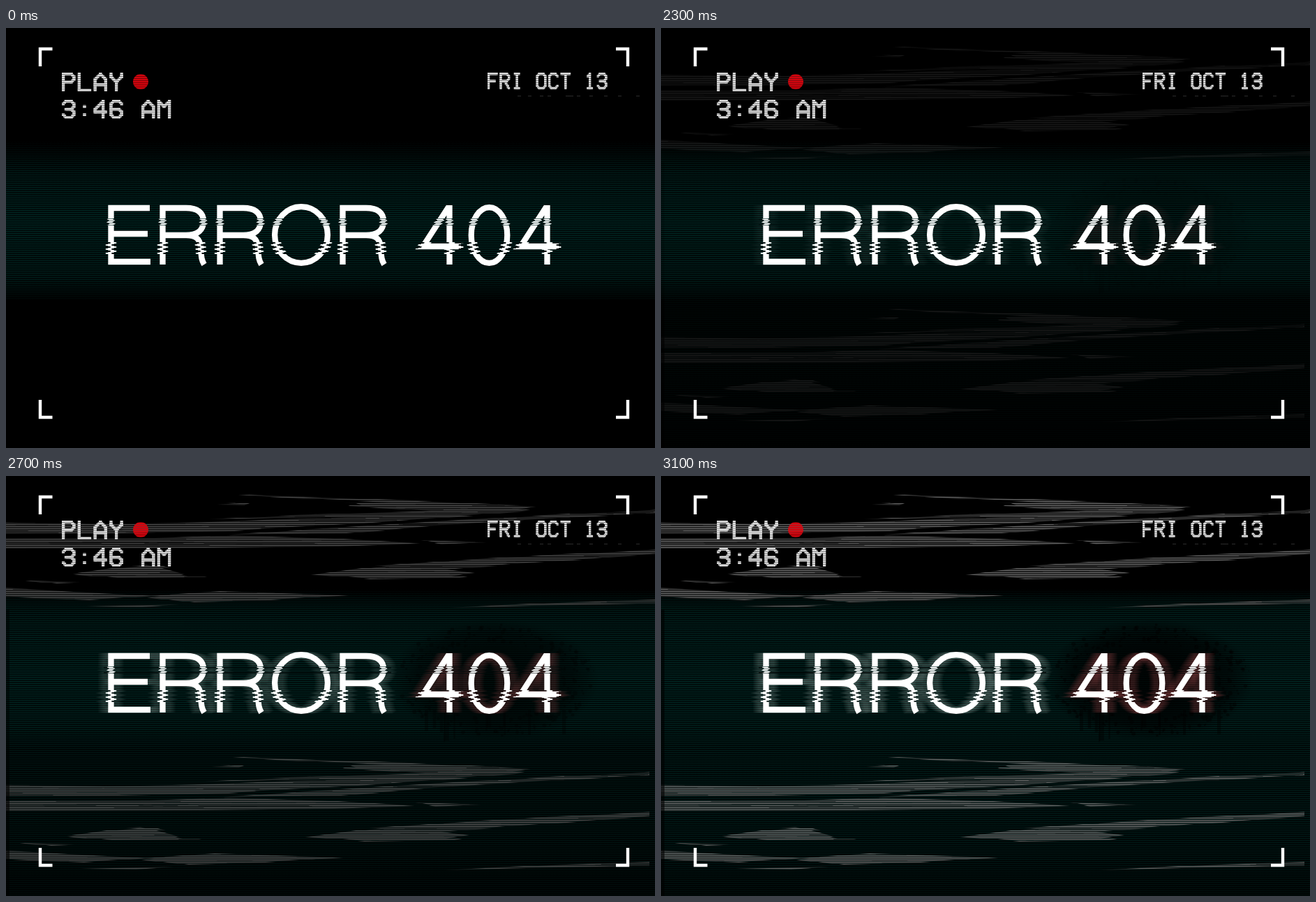
An HTML page with a canvas that plays this animation: 930 by 602 pixels, repeating every 3300 ms.

```html
<!DOCTYPE html>
<html lang="en">
<head>
<meta charset="utf-8">
<title>Error 404</title>
<style>
  html, body { margin: 0; width: 100%; height: 100%; overflow: hidden; background: #000; }
  canvas { position: absolute; left: 0; top: 0; }
  #glitch { opacity: 0; animation: flicker 3300ms step-end infinite; }
  @keyframes flicker {
    0% { opacity: 0; }
    60.6% { opacity: .5; }
    63.63% { opacity: 1; }
    69.69% { opacity: .25; }
    72.72% { opacity: 1; }
    78.78% { opacity: .5; }
    81.81% { opacity: .75; }
    84.84% { opacity: 1; }
    90.9% { opacity: .75; }
    93.93% { opacity: 1; }
  }
</style>
</head>
<body>
<canvas id="back" width="930" height="602"></canvas>
<canvas id="glitch" width="930" height="602"></canvas>
<canvas id="front" width="930" height="602" role="img"
  aria-label="PLAY 3:46 AM, FRI OCT 13, ERROR 404">PLAY 3:46 AM, FRI OCT 13, ERROR 404</canvas>
<script>
const W = 930, H = 602;
const ctxOf = id => document.getElementById(id).getContext('2d');

function layer(w = W) {
  const c = document.createElement('canvas');
  c.width = w;
  c.height = H;
  return c.getContext('2d');
}

let seed = 404;
function rand() {
  seed = (seed * 1664525 + 1013904223) >>> 0;
  return seed / 4294967296;
}
const spread = n => (rand() * 2 - 1) * n;
const tri = t => Math.asin(Math.sin(t * Math.PI * 2)) * 2 / Math.PI;

function stripes(c, top, bottom, size = 1, x = 0, w = c.canvas.width) {
  for (let y = top; y < bottom; y += 3) c.fillRect(x, y, w, size);
}

function erase(c, alpha, paint) {
  c.save();
  c.globalCompositeOperation = 'destination-out';
  c.globalAlpha = alpha;
  paint();
  c.restore();
}

function fade(c, top, bottom, rgb, stops) {
  const g = c.createLinearGradient(0, top, 0, bottom);
  for (const [at, alpha] of stops) g.addColorStop(at, `rgba(${rgb},${alpha})`);
  return g;
}

function greenField(c, top, bottom, stops) {
  c.fillStyle = fade(c, top, bottom, '0,13,12', stops);
  c.fillRect(0, top, W, bottom - top);
  c.fillStyle = fade(c, top, bottom, '0,40,36', stops);
  stripes(c, top, bottom);
}

// Lettering, broken up sideways in two bands of rows
function drawTitle() {
  const c = layer();
  c.strokeStyle = '#fff';
  c.lineWidth = 8.3;
  const draw = (d, dx = 0) => {
    c.save();
    c.translate(dx, 0);
    c.stroke(new Path2D(d));
    c.restore();
  };
  const oval = (x, y, rx, ry) => {
    c.beginPath();
    c.ellipse(x, y, rx, ry, 0, 0, Math.PI * 2);
    c.stroke();
  };
  draw('M206 258H150.5V335H207M150 295H203');
  const R = 'M224.5 339V258H258C275 258 283 265 283 277S275 297 258 297H224.5' +
    'M258 297C273 297 278 303 279 314C280 326 279.5 332 284 339';
  for (const dx of [0, 82, 258]) draw(R, dx);
  oval(423, 296.5, 37.9, 40.3);
  oval(692.5, 297, 25.8, 39.8);
  for (const dx of [0, 140]) draw('M634.5 256L597.5 313H652M635.5 254V339', dx);

  const out = layer();
  for (let y = 240; y < 350; y++) {
    const upper = y >= 273 && y < 283;
    const lower = y >= 306 && y < 325;
    const dx = upper ? 2 * tri(y / 4.5) : lower ? 5 * tri((y - 306) / 6) : 0;
    out.globalAlpha = upper && y % 3 === 0 ? .35 : 1;
    out.drawImage(c.canvas, 0, y, W, 1, dx, y, W, 1);
  }
  return out.canvas;
}

// Pixel lettering: pairs of digits are nodes on a 5 by 7 grid
const glyphs = {
  P: '06003041423303', L: '000646', A: '0602204246|0444', Y: '0001234140|2326',
  3: '01103041423313|334445361605', ':': '2222|2525', 4: '3630030444',
  6: '4130100105163645443303', M: '0600224046', F: '400006|0333',
  R: '06003041423303|2346', I: '1030|2026|1636', O: '103041453616050110',
  C: '4130100105163645', T: '0040|2026', 1: '112026|1636'
};

function pixelText(c, text, x, y, w, h) {
  [...text].forEach((ch, i) => {
    const left = x + i * w * 12;
    for (const line of (glyphs[ch] || '').split('|')) {
      const nodes = (line.match(/../g) || []).map(n => [n[0] * 2, n[1] * 2]);
      for (let k = 1; k < nodes.length; k++) {
        const [ax, ay] = nodes[k - 1], [bx, by] = nodes[k];
        const steps = Math.max(Math.abs(bx - ax), Math.abs(by - ay), 1);
        for (let s = 0; s <= steps; s++) {
          const px = Math.round(ax + (bx - ax) * s / steps);
          const py = Math.round(ay + (by - ay) * s / steps);
          c.fillRect(left + px * w, y + py * h, w * 2.2, h * 2);
        }
      }
    }
  });
}

function drawHud() {
  const c = layer();
  c.fillStyle = '#dedede';
  pixelText(c, 'PLAY', 80, 64, 1.9, 1.93);
  pixelText(c, '3:46 AM', 80, 103, 1.9, 1.93);
  pixelText(c, 'FRI OCT 13', 690, 64, 1.45, 1.72);
  c.fillStyle = '#d4040d';
  c.beginPath();
  c.arc(193, 77, 11, 0, Math.PI * 2);
  c.fill();
  erase(c, .42, () => stripes(c, 60, 134));
  c.fillStyle = '#2c2c2c';
  for (const x of [733, 748, 765, 776, 802, 818, 836, 857, 877, 903]) {
    c.fillRect(x, 97, x === 802 ? 11 : 5, 1);
  }
  return c.canvas;
}

// Tape streaks with ragged rows
function drawStreaks() {
  const pad = 40;
  const c = layer(W + pad * 2);
  c.translate(pad, 0);
  c.fillStyle = '#626262';
  [
    'M325 26L440 30 600 36 767 44 730 50 640 53 520 58 400 60 300 62 420 56 600 50 500 43 490 39 560 38 440 33Z',
    'M290 41L340 38 330 42Z',
    'M-40 66L160 69 300 66 480 59 640 52 740 50 640 59 520 68 400 74 330 79 180 82 -40 83Z',
    'M330 84L480 74 640 64 780 56 970 46 970 51 800 60 640 70 500 82Z',
    'M-40 90L220 89 330 85 480 90 590 97 480 101 280 103 -40 104Z',
    'M590 92L680 95 620 98Z',
    'M450 141L540 129 640 121 760 114 970 104 970 109 760 124 640 134 680 139 640 146 520 148Z',
    'M103 140L160 132 213 127 250 137 278 145 150 146Z',
    'M30 150L110 152 60 154Z',
    'M-40 158L90 166 210 172 120 178 -40 171Z',
    'M200 172L300 165 485 171 380 178 260 181Z',
    'M640 189L800 181 970 176 970 182 760 186Z',
    'M120 187L260 184 200 188Z'
  ].forEach(d => c.fill(new Path2D(d)));
  erase(c, .5, () => {
    for (let i = 0; i < 260; i++) {
      c.fillRect(rand() * W - 40, 26 + Math.floor(rand() * 165), 30 + rand() * 150, 1);
    }
  });
  erase(c, .6, () => stripes(c, 25, 192, 2, -pad));

  const out = layer();
  for (let y = 24; y < 192; y += 3) {
    out.drawImage(c.canvas, 0, y, W + pad * 2, 3, spread(14) - pad, y, W + pad * 2, 3);
  }
  return out.canvas;
}

function drawSplat(c) {
  c.save();
  c.translate(700, 292);
  c.scale(1.7, 1);
  const g = c.createRadialGradient(0, 0, 35, 0, 0, 88);
  g.addColorStop(0, 'rgba(0,0,0,.8)');
  g.addColorStop(.6, 'rgba(0,0,0,.55)');
  g.addColorStop(1, 'rgba(0,0,0,0)');
  c.fillStyle = g;
  c.fillRect(-90, -90, 180, 180);
  c.restore();
  c.fillStyle = 'rgba(0,0,0,.4)';
  for (let i = 0; i < 280; i++) {
    const a = rand() * Math.PI * 2, r = .7 + rand() * .35;
    c.beginPath();
    c.arc(700 + Math.cos(a) * 138 * r, 292 + Math.sin(a) * 76 * r, .6 + rand() * 2.6, 0, 7);
    c.fill();
  }
  for (let i = 0; i < 12; i++) {
    c.fillRect(600 + rand() * 200, 335, 2 + rand() * 5, 25 + rand() * 22);
  }
}

function drawGhost(title) {
  const c = layer();
  c.globalAlpha = .068;
  for (let dx = -14; dx <= 14; dx += 2) c.drawImage(title, dx, 0);
  c.globalAlpha = 1;
  c.globalCompositeOperation = 'source-atop';
  c.fillStyle = '#a0b4ae';
  c.fillRect(0, 0, 570, H);
  c.fillStyle = '#c25558';
  c.fillRect(570, 0, 360, H);
  erase(c, .3, () => stripes(c, 250, 342));
  return c.canvas;
}

const title = drawTitle();

greenField(ctxOf('back'), 162, 390, [[0, 0], [.2, .65], [.5, 1], [.85, .7], [1, .1]]);

const glitch = ctxOf('glitch');
greenField(glitch, 162, H, [[0, 0], [.06, .6], [.3, 1], [.52, .65], [.8, .6], [1, .3]]);
const streaks = drawStreaks();
glitch.drawImage(streaks, 0, 0);
glitch.drawImage(streaks, 8, 0, 922, H, 0, 376, 922, H);
drawSplat(glitch);
glitch.drawImage(drawGhost(title), 0, 0);
glitch.fillStyle = 'rgba(0,0,0,.8)';
for (const y of [274, 281]) glitch.fillRect(140, y, 412, 1.5);
glitch.fillStyle = 'rgba(0,0,0,.6)';
glitch.fillRect(0, 192, 5, 410);

const front = ctxOf('front');
front.drawImage(drawHud(), 0, 0);
front.drawImage(title, 0, 0);
front.strokeStyle = '#fff';
front.lineWidth = 4.4;
front.stroke(new Path2D('M66.5 30H49V55M874 30H891V55M66.5 558H49V533M874 558H891V533'));
</script>
</body>
</html>
```
